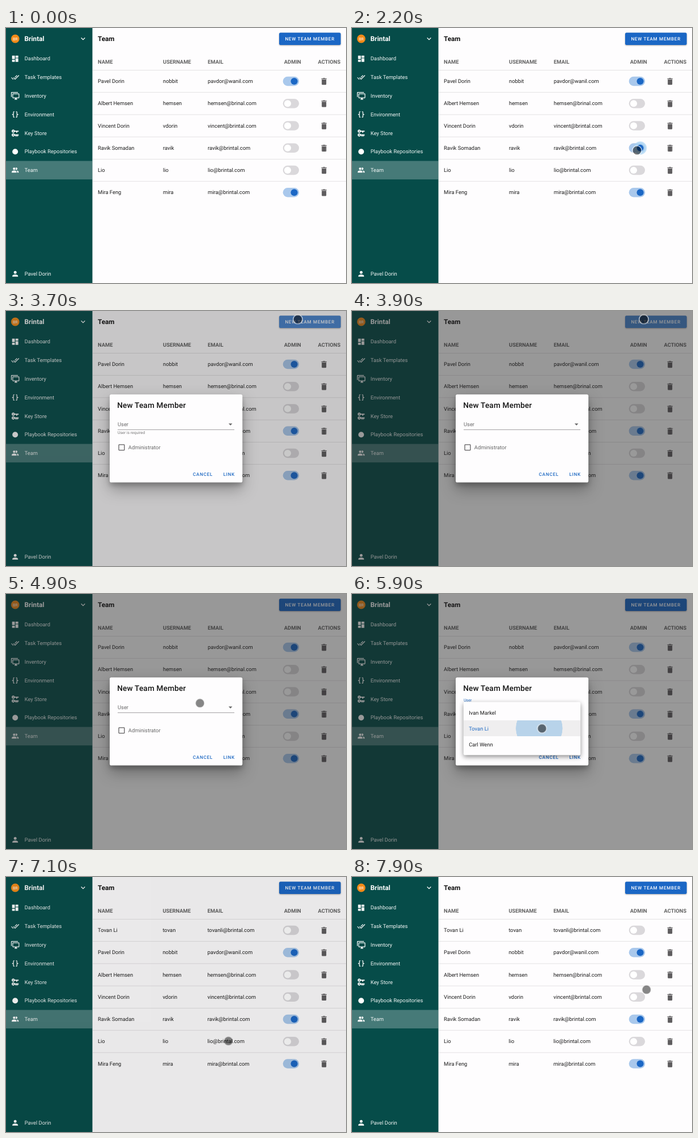
These frames come from a looping animation (600 px wide and 450 px high, 8 s). An HTML page:

```html
<!DOCTYPE html>
<html lang="en">
<head>
<meta charset="utf-8">
<title>Team</title>
<style>
html, body { margin: 0; width: 100%; height: 100%; overflow: hidden; background: #fefdfe; }
svg { display: block; width: 600px; height: 450px; }
text { font: 400 9.37px Roboto, Arial, sans-serif; fill: #1c1c1c; text-rendering: geometricPrecision; white-space: pre; }
.nav text { fill: #f3f7f6; }
.nav path { fill: #fff; }
.nav .brand { font-size: 11.8px; font-weight: 700; fill: #fff; }
.nav .initials { font-size: 7px; fill: #fff; text-anchor: middle; }
.title { font-size: 11.7px; font-weight: 700; fill: #111; }
.head text { font-weight: 700; fill: #626262; }
.btn { font-size: 8.1px; font-weight: 500; letter-spacing: .0893em; fill: #1e69c3; }
.btn.light { fill: #fff; }
.bin { fill: #5e5c5e; }
.heading { font-size: 13.65px; font-weight: 500; letter-spacing: .0125em; fill: #151515; }
.muted { fill: #666; }
.hint { font-size: 6.95px; fill: #666; }
.raised { filter: drop-shadow(0 1px 1.2px rgba(0,0,0,.32)); }
.paper { fill: #fefdfe; filter: drop-shadow(0 5px 4px rgba(0,0,0,.22)) drop-shadow(0 11px 13px rgba(0,0,0,.3)); }
.sheet { fill: #fefdfe; filter: drop-shadow(0 3px 4px rgba(0,0,0,.45)); }

/* one shared 8 s loop: 1.25% = 100 ms */
.a { animation: 8s linear infinite; }
.step { animation-timing-function: step-end; }
.before { animation-name: before; }
.after { animation-name: after; }
.thumb { animation-name: thumb; animation-timing-function: ease-in-out; }
.lit { animation-name: lit; }
.halo { animation-name: halo; }
.glow { animation-name: glow; }
.shade { animation-name: shade; }
.dialog { animation-name: dialog; transform-origin: 300px 225px; }
.hint { animation-name: hint; }
.label { animation-name: label; }
.focus { animation-name: focus; }
.value { animation-name: value; }
.menu { animation-name: menu; transform-origin: 300px 191px; }
.hover1 { animation-name: hover1; }
.hover2 { animation-name: hover2; }
.picked { animation-name: picked; }
.ripple { animation-name: ripple; }
.linkHover { animation-name: linkHover; }
.cursor { animation-name: move; animation-timing-function: ease-in-out; }
.fade { animation-name: appear; }
.ring { animation-name: press; }

@keyframes before { 0% { visibility: visible } 87.5%, 100% { visibility: hidden } }
@keyframes after { 0% { visibility: hidden } 87.5%, 100% { visibility: visible } }
@keyframes thumb { 0%, 23.75% { transform: none } 26.25%, 100% { transform: translateX(11.6px) } }
@keyframes lit { 0%, 23.75% { opacity: 0 } 26.25%, 100% { opacity: 1 } }
@keyframes halo {
  0%, 23.75% { opacity: 0; transform: translate(508.6px, 211.8px) scale(.3) }
  25% { opacity: .8 }
  27.5% { opacity: .8; transform: translate(508.6px, 211.8px) scale(1) }
  30%, 100% { opacity: 0; transform: translate(508.6px, 211.8px) scale(1) }
}
@keyframes glow { 0%, 40.5% { opacity: 0 } 42.5%, 50% { opacity: .2 } 54% { opacity: .08 } 55%, 100% { opacity: 0 } }
@keyframes shade {
  0%, 43.75% { opacity: 0 } 46.25% { opacity: .54 } 48.75%, 85.625% { opacity: 1 }
  88.75% { opacity: .2 } 89.5%, 100% { opacity: 0 }
}
@keyframes dialog {
  0%, 43.75% { opacity: 0; transform: scale(.8) }
  45.6%, 85.625% { opacity: 1; transform: none }
  87.5%, 100% { opacity: 0; transform: scale(.9) }
}
@keyframes hint {
  0%, 45% { opacity: 1; transform: translateY(4px) }
  46.25% { opacity: .9; transform: none }
  48%, 100% { opacity: 0; transform: translateY(-6px) }
}
@keyframes label {
  0%, 63.75% { fill: #666; transform: translate(197px, 203.2px) }
  65.6%, 100% { fill: #1e69c3; transform: translate(197px, 189.7px) scale(.747) }
}
@keyframes focus { 0%, 63.75% { opacity: 0 } 65.6%, 100% { opacity: 1 } }
@keyframes value { 0% { opacity: 0 } 75.625%, 100% { opacity: 1 } }
@keyframes menu {
  0%, 64.375% { opacity: 0; transform: scale(.85) }
  66.25%, 75% { opacity: 1; transform: none }
  76.9%, 100% { opacity: 0; transform: none }
}
@keyframes hover1 { 0% { opacity: 0 } 65% { opacity: 1 } 68.5%, 100% { opacity: 0 } }
@keyframes hover2 { 0% { opacity: 0 } 68.5%, 100% { opacity: 1 } }
@keyframes picked { 0% { fill: #1c1c1c } 73%, 100% { fill: #1e69c3 } }
@keyframes ripple {
  0%, 72.5% { opacity: 0; transform: translate(335px, 237px) scale(.1) }
  73% { opacity: 1 }
  73.75% { opacity: 1; transform: translate(330.5px, 237px) scale(.395) }
  75.6% { opacity: .7; transform: translate(308px, 237px) scale(1) }
  76.5%, 100% { opacity: 0; transform: translate(300px, 237px) scale(1.1) }
}
@keyframes linkHover { 0%, 82.5% { opacity: 0 } 83.5% { opacity: .08 } 85%, 100% { opacity: .2 } }
@keyframes move {
  0%, 12.5% { transform: translate(440px, 330px) }
  20%, 32.5% { transform: translate(503px, 216px) }
  41.25%, 53.75% { transform: translate(515px, 14.6px) }
  62.5%, 65% { transform: translate(335px, 200px) }
  71.25%, 76.25% { transform: translate(335.3px, 237.3px) }
  83.75%, 90% { transform: translate(392.5px, 289.5px) }
  98.75%, 100% { transform: translate(519.7px, 198.8px) }
}
@keyframes appear { 0%, 11.25% { opacity: 0 } 13.75%, 100% { opacity: 1 } }
@keyframes press {
  0%, 22.5% { opacity: 0 } 23.75%, 28.75% { opacity: 1 } 30.6%, 41.25% { opacity: 0 }
  42.5%, 49.5% { opacity: 1 } 52.5%, 61.9% { opacity: 0 }
  63%, 65% { opacity: 1 } 66.25%, 71.25% { opacity: 0 }
  72.5%, 74.4% { opacity: 1 } 76.25%, 83.75% { opacity: 0 }
  84.5%, 86.25% { opacity: 1 } 87.5%, 100% { opacity: 0 }
}
</style>
</head>
<body>
<svg viewBox="0 0 600 450">
  <defs>
    <clipPath id="rowClip"><rect x="197" y="223" width="206" height="28"/></clipPath>
    <clipPath id="hintClip"><rect x="190" y="212.3" width="200" height="20"/></clipPath>
  </defs>

  <rect width="600" height="450" fill="#fefdfe"/>
  <text class="title" x="162" y="23">Team</text>
  <rect class="raised" x="482" y="8.3" width="108.7" height="21.6" rx="2.6" fill="#1b67c5"/>
  <rect class="a glow" x="482" y="8.3" width="108.7" height="21.6" rx="2.6" fill="#fff"/>
  <text class="btn light" x="492.4" y="22.1">NEW TEAM MEMBER</text>
  <g id="before" class="a step before"></g>
  <g id="after" class="a step after"></g>

  <g id="nav" class="nav"></g>

  <g class="a shade"><rect width="600" height="450" fill="#212121" opacity=".46"/></g>

  <g class="a dialog">
    <rect class="paper" x="183" y="147.3" width="234.2" height="155.3" rx="2.8"/>
    <text class="heading" x="196.2" y="170.5">New Team Member</text>
    <text class="a label">User</text>
    <text class="a step value" x="197" y="203.6" id="value"></text>
    <path d="M392.8 198.6h6.6l-3.3 3.3z" fill="#666"/>
    <rect x="197" y="209.1" width="206" height=".8" fill="#8c8a8c"/>
    <rect class="a focus" x="197" y="208.8" width="206" height="1.4" fill="#1e69c3"/>
    <g clip-path="url(#hintClip)"><text class="a hint" x="197" y="217.2">User is required</text></g>
    <rect x="199.1" y="235.9" width="9.8" height="9.8" rx=".8" fill="none" stroke="#5f5d5f" stroke-width="1.3"/>
    <text class="muted" x="215.8" y="244.1">Administrator</text>
    <rect class="a linkHover" x="376" y="276" width="36" height="24" rx="2.6" fill="#1e69c3"/>
    <text class="btn" x="329.8" y="290.8">CANCEL</text>
    <text class="btn" x="383.5" y="290.8">LINK</text>
    <g class="a menu">
      <rect class="sheet" x="196.8" y="190.6" width="206.4" height="93.6" rx="2.8"/>
      <rect class="a step hover1" x="197" y="195" width="206" height="28" fill="#f3f2f3"/>
      <rect class="a step hover2" x="197" y="223" width="206" height="28" fill="#efeeef"/>
      <g clip-path="url(#rowClip)"><circle class="a ripple" r="103" fill="#b8d3ea"/></g>
      <g id="options"></g>
    </g>
  </g>

  <g class="a cursor"><g class="a fade">
    <circle r="7.5" fill="#000" opacity=".47"/>
    <circle class="a ring" r="8.2" fill="rgba(0,0,0,.1)" stroke="rgba(255,255,255,.7)" stroke-width="1.3"/>
  </g></g>
</svg>

<script>
const $ = id => document.getElementById(id);
const text = (x, y, s, cls = '') => `<text x="${x}" y="${y}" class="${cls}">${s}</text>`;
const icon = (cx, cy, d, size = 14, cls = '') =>
  `<path class="${cls}" d="${d}" transform="translate(${cx - size / 2} ${cy - size / 2}) scale(${size / 24})"/>`;

const icons = {
  dashboard: 'M13,3V9H21V3M13,21H21V11H13M3,21H11V15H3M3,13H11V3H3V13Z',
  checks: 'M0.41,13.41L6,19L7.41,17.58L1.83,12M22.24,5.58L11.66,16.17L7.5,12L6.07,13.41L11.66,19L23.66,7M18,7L16.59,5.58L10.24,11.93L11.66,13.34L18,7Z',
  monitors: 'M22,17V7H6V17H22M22,5A2,2 0 0,1 24,7V17C24,18.11 23.1,19 22,19H16V21H18V23H10V21H12V19H6C4.89,19 4,18.11 4,17V7A2,2 0 0,1 6,5H22M2,3V15H0V3A2,2 0 0,1 2,1H20V3H2Z',
  braces: 'M8,3A2,2 0 0,0 6,5V9A2,2 0 0,1 4,11H3V13H4A2,2 0 0,1 6,15V19A2,2 0 0,0 8,21H10V19H8V14A2,2 0 0,0 6,12A2,2 0 0,0 8,10V5H10V3M16,3A2,2 0 0,1 18,5V9A2,2 0 0,0 20,11H21V13H20A2,2 0 0,0 18,15V19A2,2 0 0,1 16,21H14V19H16V14A2,2 0 0,1 18,12A2,2 0 0,1 16,10V5H14V3H16Z',
  keys: 'M6.5,2C8.46,2 10.13,3.25 10.74,5H22V8H18V11H15V8H10.74C10.13,9.75 8.46,11 6.5,11A4.5,4.5 0 0,1 6.5,2M6.5,5A1.5,1.5 0 0,0 6.5,8A1.5,1.5 0 0,0 6.5,5M6.5,13C8.46,13 10.13,14.25 10.74,16H22V19H20V22H18V19H16V22H13V19H10.74C10.13,20.75 8.46,22 6.5,22A4.5,4.5 0 0,1 6.5,13M6.5,16A1.5,1.5 0 0,0 6.5,19A1.5,1.5 0 0,0 6.5,16Z',
  people: 'M16 17V19H2V17S2 13 9 13 16 17 16 17M12.5 7.5A3.5 3.5 0 1 0 9 11A3.5 3.5 0 0 0 12.5 7.5M15.94 13A5.32 5.32 0 0 1 18 17V19H22V17S22 13.37 15.94 13M15 4A3.39 3.39 0 0 0 13.07 4.59A5 5 0 0 1 13.07 10.41A3.39 3.39 0 0 0 15 11A3.5 3.5 0 0 0 15 4Z',
  person: 'M12,4A4,4 0 0,1 16,8A4,4 0 0,1 8,8A4,4 0 0,1 12,4M12,14C16.42,14 20,15.79 20,18V20H4V18C4,15.79 7.58,14 12,14Z',
  chevron: 'M7.41,8.58L12,13.17L16.59,8.58L18,10L12,16L6,10Z',
  bin: 'M19,4H15.5L14.5,3H9.5L8.5,4H5V6H19M6,19A2,2 0 0,0 8,21H16A2,2 0 0,0 18,19V7H6V19Z'
};

const owner = 'Pavel Dorin';
const members = [
  [owner, 'nobbit', 'pavdor@wanil.com', 'on'],
  ['Albert Hemsen', 'hemsen', 'hemsen@brinal.com'],
  ['Vincent Dorin', 'vdorin', 'vincent@brintal.com'],
  ['Ravik Somadan', 'ravik', 'ravik@brintal.com', 'turning'],
  ['Lio', 'lio', 'lio@brintal.com'],
  ['Mira Feng', 'mira', 'mira@brintal.com', 'on']
];
const newcomer = ['Tovan Li', 'tovan', 'tovanli@brintal.com'];

const track = (y, fill, cls = '') =>
  `<rect class="${cls}" x="488.7" y="${y - 8.2}" width="28.4" height="16.4" rx="8.2" fill="${fill}"/>`;
const knob = (x, y, fill, cls = '') => `<circle class="${cls}" cx="${x}" cy="${y}" r="6.1" fill="${fill}"/>`;

function toggle(y, state) {
  if (state === 'on') return track(y, '#a9c8ec') + knob(508.6, y, '#1b67c5');
  if (state !== 'turning') return track(y, '#dad8db') + knob(497, y, '#fff');
  return track(y, '#dad8db') + track(y, '#a9c8ec', 'a lit') +
    '<circle class="a halo" r="11.4" fill="#a9d3f3"/>' +
    `<g class="a thumb">${knob(497, y, '#fff')}${knob(497, y, '#1b67c5', 'a lit')}</g>`;
}

function table(rows, shift) {
  const user = 277 - shift, mail = 356 - shift;
  const heads = [[162, 'NAME'], [user, 'USERNAME'], [mail, 'EMAIL'], [490.8, 'ADMIN'], [550.6, 'ACTIONS']];
  return `<g class="head">${heads.map(([x, s]) => text(x, 63.4, s)).join('')}</g>` +
    rows.map(([name, login, email, state], i) => {
      const y = 94 + 39.25 * i;
      return `<rect x="153" y="${y - 20}" width="447" height=".8" fill="#dddbdd"/>` +
        text(162, y + 3.2, name) + text(user, y + 3.2, login) + text(mail, y + 3.2, email) +
        toggle(y, state) + icon(561.2, y + .3, icons.bin, 16, 'bin');
    }).join('');
}

$('before').innerHTML = table(members, 0);
$('after').innerHTML = table([newcomer, ...members.map(m => m[3] === 'turning' ? [...m.slice(0, 3), 'on'] : m)], .6);

const items = [
  ['Dashboard', 'dashboard'], ['Task Templates', 'checks'], ['Inventory', 'monitors'],
  ['Environment', 'braces'], ['Key Store', 'keys'], ['Playbook Repositories'], ['Team', 'people']
];
$('nav').innerHTML =
  '<rect width="152.5" height="450" fill="#064c49"/>' +
  '<rect y="234.6" width="152.5" height="32.6" fill="#fff" opacity=".26"/>' +
  '<circle cx="16.3" cy="19" r="7.4" fill="#f28a18"/>' +
  text(16.3, 21.5, 'BR', 'initials') + text(32.6, 23, 'Brintal', 'brand') +
  icon(136, 19, icons.chevron, 15) +
  items.map(([label, key], i) => {
    const y = 54.2 + 32.8 * i;
    const mark = key ? icon(16.2, y, icons[key], 14.6) : `<circle cx="16.2" cy="${y}" r="5" fill="#fff"/>`;
    return mark + text(32.7, y + 3.2, label);
  }).join('') +
  icon(16.2, 433.8, icons.person, 15) + text(32.7, 437, owner);

$('options').innerHTML = ['Ivan Markel', newcomer[0], 'Carl Wenn']
  .map((s, i) => text(206.2, 212.6 + 28.2 * i, s, i === 1 ? 'a step picked' : '')).join('');
$('value').textContent = newcomer[0];
</script>
</body>
</html>
```
